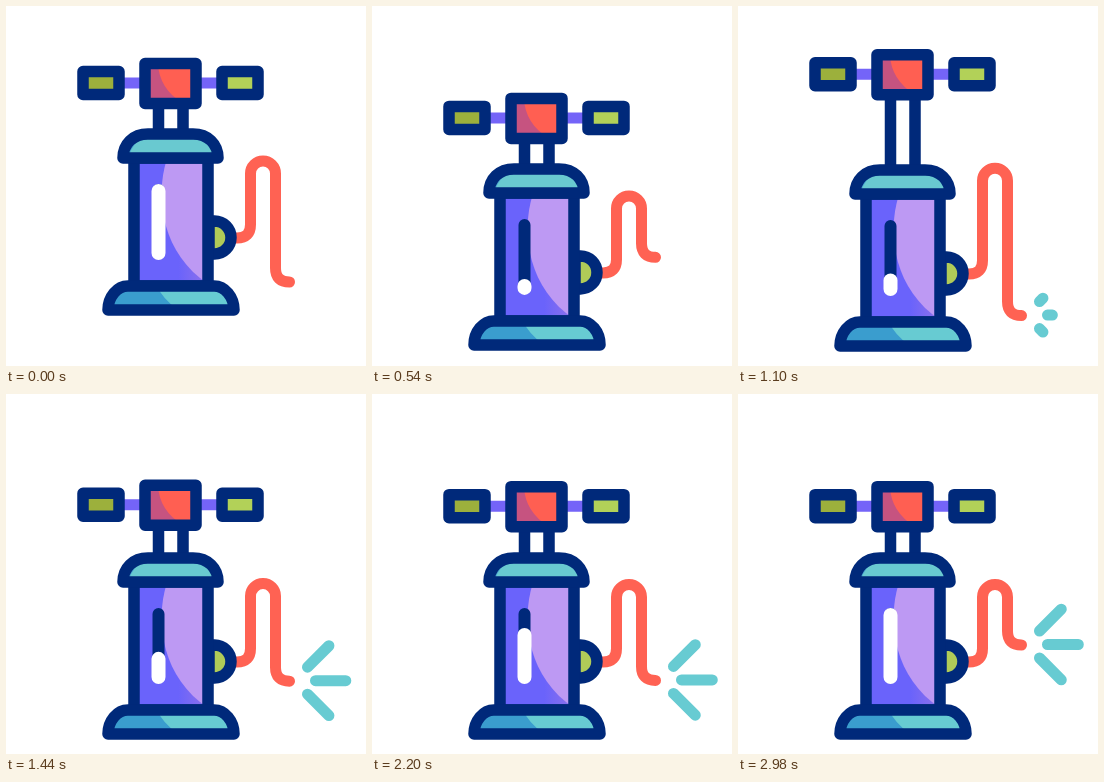
An HTML page for the animation above (3000 ms loop, 360x360 px).

```html
<!DOCTYPE html>
<html lang="en">
<head>
<meta charset="utf-8">
<title>Air pump</title>
<style>
  html, body { margin: 0; width: 100%; height: 100%; overflow: hidden; background: #fff; }
  svg { display: block; width: 100vw; height: 100vh; }
  .line { fill: none; stroke: #00297a; stroke-width: 11.5; stroke-linejoin: round; }
  .hose { fill: none; stroke: #ff6253; stroke-width: 11; stroke-linecap: round; }
  .spray { fill: none; stroke: #67cbd2; stroke-width: 11; stroke-linecap: round; }
  .slot { fill: none; stroke-linecap: round; }
</style>
</head>
<body>
<svg viewBox="0 0 360 360">
  <defs>
    <linearGradient id="violet">
      <stop offset=".6" stop-color="#6a63fb"/>
      <stop offset="1" stop-color="#8f72ea"/>
    </linearGradient>
  </defs>

  <path id="hose" class="hose"/>
  <path id="spray" class="spray"/>
  <path id="rods" class="line"/>

  <g id="head">
    <path d="M116 25.5H137M193 25.5H214" stroke="#7464f8" stroke-width="11"/>
    <rect x="139" y="6" width="51" height="40" fill="#ff5f52"/>
    <path d="M139 6H152Q153 31 177 46H139Z" fill="#c65380"/>
    <rect class="line" x="139" y="6" width="51" height="40"/>
    <rect x="77" y="14" width="36" height="23" fill="#9cb03c"/>
    <rect class="line" x="77" y="14" width="36" height="23"/>
    <rect x="216" y="14" width="36" height="23" fill="#b2d158"/>
    <rect class="line" x="216" y="14" width="36" height="23"/>
  </g>

  <g id="body">
    <path class="line" d="M203 251H208.500A16.500 16.500 0 0 1 208.500 284H203Z" style="fill:#b0cb58"/>

    <rect x="128" y="188" width="74" height="128" fill="url(#violet)"/>
    <path d="M160.500 190C148.500 230 157 284 202 314V190Z" fill="#bd99f3"/>
    <rect class="line" x="128" y="188" width="74" height="128"/>

    <path d="M117 188C117 174 127 164 142 164H187C202 164 212 174 212 188Z" fill="#69c9d0"/>
    <path d="M117 188C117 174 127 164 142 164Q127 171 122 188Z" fill="#4aa6cf"/>
    <path class="line" d="M117 188C117 174 127 164 142 164H187C202 164 212 174 212 188Z"/>

    <path d="M102 340C102 327 111 316 122 316H208C219 316 228 327 228 340Z" fill="#67cbd2"/>
    <path d="M102 340C102 327 111 316 122 316H151Q156 328 172 340Z" fill="#3a9dce"/>
    <path class="line" d="M102 340C102 327 111 316 122 316H208C219 316 228 327 228 340Z"/>

    <path class="slot" d="M152.500 220V283" stroke="#00297a" stroke-width="12"/>
    <path id="gauge" class="slot" stroke="#fff" stroke-width="14"/>
  </g>
</svg>
<script>
  const LOOP = 3000, LANDED = 610, STROKE = 780;
  const FIRST_PEAK = LANDED + STROKE / 2, LAST_PEAK = FIRST_PEAK + 2 * STROKE;
  const $ = id => document.getElementById(id);
  const clamp = x => Math.min(1, Math.max(0, x));
  const ease = x => (1 - Math.cos(Math.PI * clamp(x))) / 2;
  const mix = (a, b, k) => a + (b - a) * k;

  // How far the handle is pulled up: 0 pressed, 1 raised.
  function pull(t) {
    return t < LANDED ? 0 : (1 - Math.cos(2 * Math.PI * (t - LANDED) / STROKE)) / 2;
  }

  function gaugeLevel(t) {
    if (t < LANDED) return 1 - ease(t / LANDED);
    const p = clamp((t - 720) / 2260);
    return mix(p, ease(p), 0.3);
  }

  function hoseEnd(t, lift) {
    if (t < LANDED) return mix(276, 250.5, ease(t / LANDED));
    const pressed = t < FIRST_PEAK || t > LAST_PEAK ? 250 : 286;
    return mix(pressed, 314, lift);
  }

  function sprayLength(t, lift) {
    if (t < FIRST_PEAK) return 0;
    if (t < FIRST_PEAK + STROKE / 2) return 31 * (1 - lift);
    return mix(31, t < LANDED + 2 * STROKE ? 14 : 17.5, lift);
  }

  function sprayPath(y, length) {
    if (length < 0.1) return "";
    const d = length * Math.SQRT1_2;
    return `M301.5 ${y - 14}l${d} ${-d}M309.5 ${y - 0.5}h${length}M301.5 ${y + 13}l${d} ${d}`;
  }

  function draw(t) {
    const lift = pull(t);
    const shift = -36 * (1 - ease(t / LANDED));
    const headY = 87.5 - 53 * lift + shift;
    const archY = 203.5 - 34 * lift + shift;
    const endY = hoseEnd(t, lift);

    $("head").setAttribute("transform", `translate(0 ${headY})`);
    $("body").setAttribute("transform", `translate(0 ${shift})`);
    $("rods").setAttribute("d",
      `M152.5 ${headY + 46}V${164 + shift}M177 ${headY + 46}V${164 + shift}`);
    $("gauge").setAttribute("d", `M152.5 283V${283 - 62 * gaugeLevel(t)}`);
    $("hose").setAttribute("d",
      `M228 ${268 + shift}H231q13.5 0 13.5 -13.5V${archY}` +
      `a12.5 12.5 0 0 1 25 0V${endY - 14}q0 14 14 14`);
    $("spray").setAttribute("d", sprayPath(endY, sprayLength(t, lift)));
  }

  const start = performance.now();
  function tick() {
    draw((performance.now() - start) % LOOP);
    requestAnimationFrame(tick);
  }
  draw(0);
  requestAnimationFrame(tick);
</script>
</body>
</html>
```
